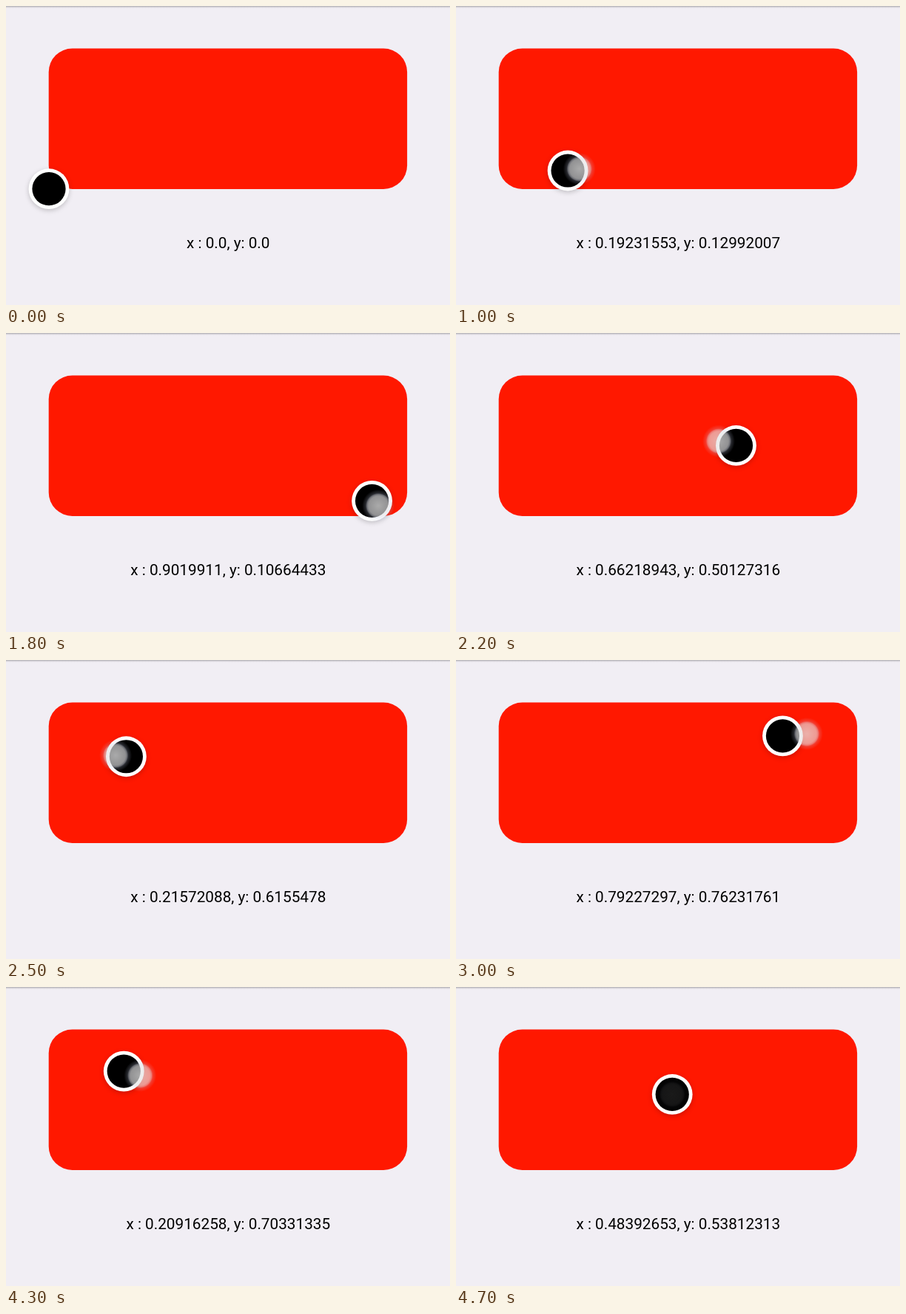
An HTML page for the animation above (4800 ms loop, 600 by 405 pixels).

```html
<!DOCTYPE html>
<html lang="en">
<head>
<meta charset="utf-8">
<title>Drag pad</title>
<style>
  html, body { margin: 0; width: 100%; height: 100%; overflow: hidden; background: #f1eef4; }
  svg { display: block; width: 600px; height: 405px; }
  text { font: 20.75px Roboto, sans-serif; text-anchor: middle; white-space: pre; }
  #thumb { filter: drop-shadow(0 2px 3px rgba(0, 0, 0, .2)); }
</style>
</head>
<body>
<svg viewBox="0 0 600 405">
  <defs>
    <linearGradient id="edge" x2="0" y2="1">
      <stop stop-color="#a6a5a9"/>
      <stop offset=".3" stop-color="#c9c7cc"/>
      <stop offset="1" stop-color="#f1eef4"/>
    </linearGradient>
    <radialGradient id="glow">
      <stop stop-color="#e6e6e6" stop-opacity=".74"/>
      <stop offset=".6" stop-color="#e4e4e6" stop-opacity=".64"/>
      <stop offset=".7" stop-color="#dcdfea" stop-opacity=".5"/>
      <stop offset=".78" stop-color="#c8d0ea" stop-opacity=".2"/>
      <stop offset="1" stop-color="#c0c8e8" stop-opacity="0"/>
    </radialGradient>
  </defs>
  <rect width="600" height="3" fill="url(#edge)"/>
  <rect x="57.7" y="57.5" width="484.4" height="190.4" rx="32" fill="#ff1800"/>
  <g id="thumb">
    <circle r="27.4" fill="#fff"/>
    <circle r="22.6"/>
  </g>
  <circle id="finger" r="22" fill="url(#glow)"/>
  <text id="label" x="300.3" y="328"></text>
</svg>
<script>
const LOOP = 4800, STEP = 100, LEAD = 37;
const [thumb, finger, label] = ['thumb', 'finger', 'label'].map(id => document.getElementById(id));

// Main points of the drag: time in ms, then x and y as shares of the pad
const path = [
  [700, 0, 0],
  [1000, .19231553, .12992007],
  [1500, .68124377, .26031842],
  [1800, .9019911, .10664433],
  [1900, .93017264, .02318455],
  [2200, .66218943, .50127316],
  [2500, .21572088, .6155478],
  [2700, .16127543, .64218537],
  [3100, .90912437, .80217345],
  [3600, .01966878, .9732214],
  [4100, .02031746, .87124593],
  [4300, .20916258, .70331335],
  [4500, .45871236, .55124378],
  [4700, .48392653, .53812313]
];
const last = path.length - 1;

// Zero at the ends and wherever the drag turns around
function slope(i, c) {
  if (i === 0 || i === last) return 0;
  const [a, p, b] = path.slice(i - 1, i + 2);
  return (p[c] - a[c]) * (b[c] - p[c]) > 0 ? (b[c] - a[c]) / (b[0] - a[0]) : 0;
}

// Cubic Hermite curve through the path points
function at(time) {
  const t = Math.min(Math.max(time, path[0][0]), path[last][0]);
  const i = Math.max(1, path.findIndex(p => p[0] >= t));
  const a = path[i - 1], b = path[i], d = b[0] - a[0], u = (t - a[0]) / d;
  return [1, 2].map(c => {
    const v = a[c] + (b[c] - a[c]) * u * u * (3 - 2 * u)
      + d * u * (1 - u) * ((1 - u) * slope(i - 1, c) - u * slope(i, c));
    return Math.min(1, Math.max(0, v));
  });
}

const place = (el, [x, y]) =>
  el.setAttribute('transform', `translate(${58 + 484 * x} ${247.7 - 190 * y})`);

function show(v) {
  const n = Number(v.toFixed(8));
  return Number.isInteger(n) ? n.toFixed(1) : String(n);
}

// The touch mark fades in when the drag starts and out when it ends
function touch(t) {
  const fadeIn = (t - 600) / 200, fadeOut = (4730 - t) / 200;
  return Math.max(0, Math.min(1, fadeIn, fadeOut));
}

function draw(now) {
  const t = Math.floor(now % LOOP / STEP) * STEP;
  const [x, y] = at(t);
  place(thumb, [x, y]);
  place(finger, at(t + LEAD));
  finger.setAttribute('opacity', touch(t));
  label.textContent = `x : ${show(x)}, y: ${show(y)}`;
}

const start = performance.now();
function tick() {
  draw(performance.now() - start);
  requestAnimationFrame(tick);
}
tick();
</script>
</body>
</html>
```
